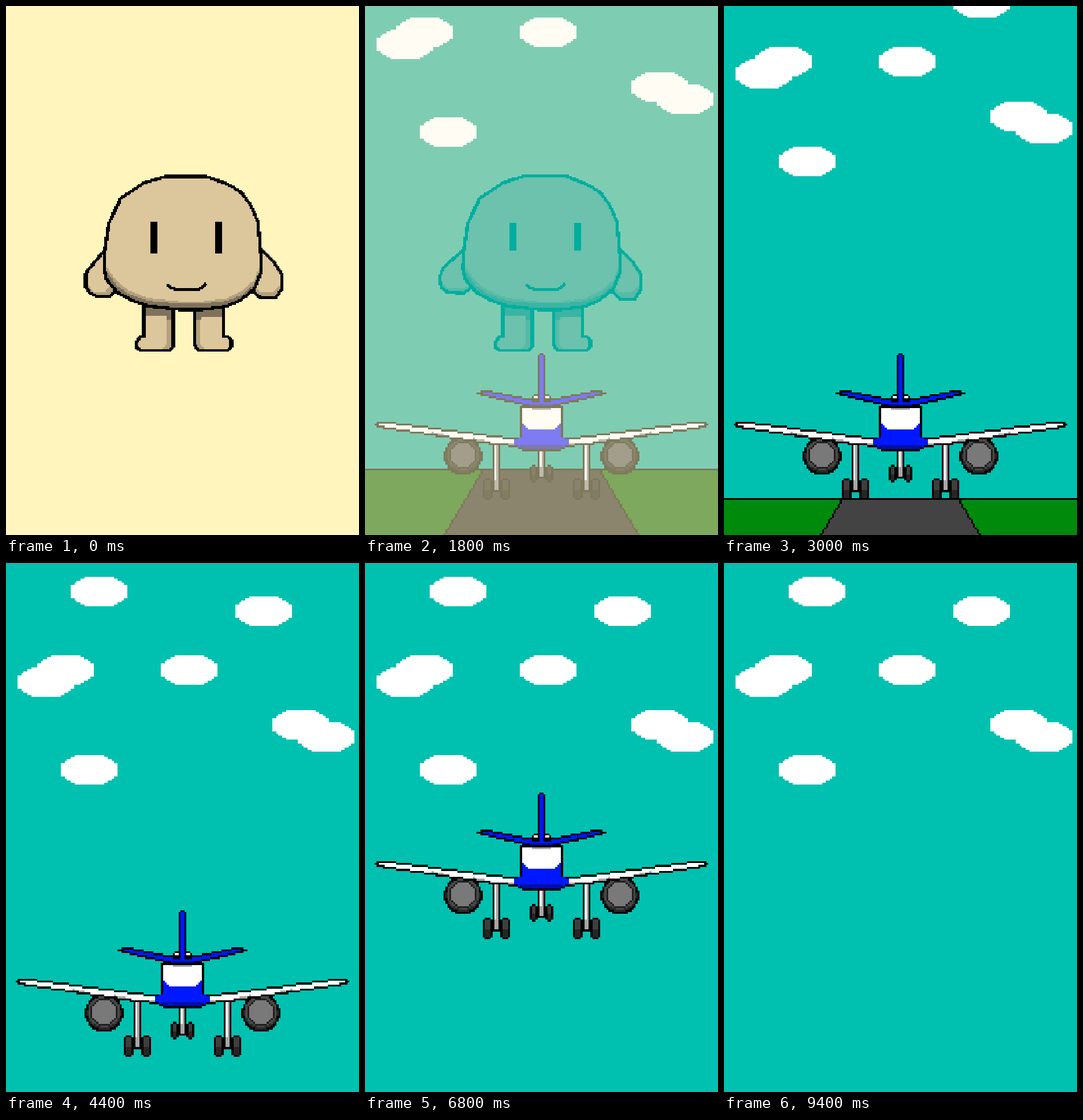
These frames come from a looping animation (611x917 px, 9600 ms). An HTML page with a canvas:

```html
<!DOCTYPE html>
<html>
<head>
<meta charset="utf-8">
<style>
html, body { margin: 0; width: 611px; height: 917px; overflow: hidden; background: #fff5bd; }
canvas { display: block; }
</style>
</head>
<body>
<script>
const W = 611, H = 917, UNIT = W / 180, STEP = 200, FRAMES = 48;

function makeCanvas(w, h) {
  const canvas = Object.assign(document.createElement('canvas'), { width: w, height: h });
  return canvas.getContext('2d', { willReadFrequently: true });
}

// Rasterises paths into hard-edged cells; paths are in cell units unless an origin and scale are given.
function sprite(x, y, cols, rows, unit, paint, ox = 0, oy = 0, scale = 1) {
  const edge = (start, i) => Math.round(start + i * unit) - Math.round(start);
  const ctx = makeCanvas(edge(x, cols), edge(y, rows));
  const shape = (d, fill, stroke, width = 1) => {
    const path = new Path2D(d);
    ctx.lineWidth = width;
    for (let j = 0; j < rows; j++) for (let i = 0; i < cols; i++) {
      const px = ox + i * scale, py = oy + j * scale;
      const color = stroke && ctx.isPointInStroke(path, px, py) ? stroke
        : fill && ctx.isPointInPath(path, px, py) ? fill : null;
      if (!color) continue;
      ctx.fillStyle = color;
      const left = edge(x, i), top = edge(y, j);
      ctx.fillRect(left, top, edge(x, i + 1) - left, edge(y, j + 1) - top);
    }
  };
  paint(shape);
  return { img: ctx.canvas, x: Math.round(x), y: Math.round(y) };
}

const circle = (x, y, r) => `M${x - r} ${y}a${r} ${r} 0 1 1 ${2 * r} 0a${r} ${r} 0 1 1 ${-2 * r} 0Z`;

function paintPlane(shape) {
  const BLUE = '#0018ff', NAVY = '#000fa8', GREY = '#a6a6a6';

  const wheel = (x, y, w, h) => {
    const d = `M${x} ${y + 1}L${x + 1} ${y}H${x + w - 1}L${x + w} ${y + 1}V${y + h - 1}L${x + w - 1} ${y + h}H${x + 1}L${x} ${y + h - 1}Z`;
    shape(d, '#3e3e3e');
    shape(`M${x} ${y + h * .6}H${x + w}V${y + h - 1}L${x + w - 1} ${y + h}H${x + 1}L${x} ${y + h - 1}Z`, '#262626');
    shape(d, null, '#000');
  };
  const gear = (x, top, bottom, size, tall) => {
    shape(`M${x} ${top}V${bottom}H${x + 3}V${top}Z`, '#fff', '#000');
    shape(`M${x + 1.5} ${bottom - 5.5}V${bottom - .5}`, null, GREY, 2);
    shape(`M${x + 2} ${top}V${bottom - .5}`, null, GREY);
    wheel(x - 1 - size, bottom - 6, size, tall);
    wheel(x + 4, bottom - 6, size, tall);
  };
  const engine = x => {
    shape(circle(x, 52, 9.2), '#282828');
    shape(circle(x, 51, 8.3), '#484848');
    shape(circle(x, 52, 9.2), null, '#000');
    shape(circle(x, 51.5, 6.6), '#797979', '#202020');
  };
  const wing = side => {
    const at = x => side < 0 ? x : 169 - x;
    const d = `M${at(0)} 36L${at(2)} 35H${at(7)}L${at(73)} 43.6V47L${at(60)} 45.8L${at(2)} 37.2Z`;
    shape(d, '#fff');
    for (const x of [28, 49, 65]) {
      const y = 36.2 + x * .146;
      shape(`M${at(x)} ${y}L${at(x + 6)} ${y + .9}`, null, GREY);
    }
    shape(d, null, '#000');
  };

  gear(60, 45, 70, 4, 10);
  gear(106, 45, 70, 4, 10);
  gear(83, 49, 63, 3, 8);
  engine(44.5);
  engine(124.5);
  wing(-1);
  wing(1);
  shape('M74 27H95V43H74Z', '#fff', '#000');
  shape('M80 28H89', null, GREY);
  shape('M75 36L79 39H90L94 36V44H75Z', BLUE, BLUE, .2);
  shape('M74.6 42L71 44V46L76 49H93L98 46V44L94.4 42Z', BLUE, BLUE, .2);
  shape('M74 47.5H95', null, NAVY, 1.2);
  shape('M70 46.5L76 49H93L99 46.5', null, '#000');
  shape('M79 25V23L81 21H88L90 23V25Z', '#fff', '#000');
  shape('M53 20L55 19H57L80 23.5H89L112 19H114L116 20L114 21L92 26L88 27H81L77 26L55 21Z', BLUE, '#000');
  shape('M79 25.6H90', null, NAVY);
  shape('M83 1L84 0H85L86 1V24H83Z', BLUE, '#000');
  shape('M84.5 20V24.6', null, BLUE, 2);
}

const toPath = points => 'M' + points.map(p => p.join(' ')).join('L');
const morph = (a, b, k) => toPath(a.map((p, i) => p.map((v, j) => v + (b[i][j] - v) * k)));

// Idle pose: 0 is rest, 1 has the left arm lifted and the eyes narrowed.
function paintBuddy(shape, k) {
  const TAN = '#dcc69c', MID = '#b3a07e', SHADE = '#7f725b', LINE = 5.6;
  const top = `M275 ${296 - k}H348L384 309L407 323L424 346L436 374L441 430`;
  const flank = 'L171 425L178 376L199 333L240 306Z';
  const body = top + `L442 460L429 492L404 511L380 521L340 526H300L245 520L215 509L192 496L174 474L${170 - k} 455` + flank;
  const limb = (d, light) => {
    shape(d, MID);
    shape(light, TAN);
    shape(d, null, '#000', LINE);
  };

  const left = morph(
    [[170, 424], [138, 463], [138, 487], [146, 498], [156, 503], [180, 503], [190, 493]],
    [[169, 424], [136, 453], [129, 470], [132, 488], [143, 496], [170, 498], [186, 487]], k);
  limb(left, `M168 428L${140 - 6 * k} ${463 - 7 * k}L${140 - 8 * k} ${482 - 4 * k}L${152 - 8 * k} ${495 - 6 * k}L172 ${495 - 6 * k}L180 484Z`);
  limb(`M441 422L463 443L478 466V490L467 ${506 + 2 * k}H441L429 496Z`, 'M441 426L461 445L474 466V484L464 495H440L432 488Z');

  limb('M239 522V573L232 574L226 582V592L233 597H284L289 590V522Z', 'M240 522V575L230 579V592L235 595H270L278 587V522Z');
  limb('M327 522V588L333 597H384L390 590V580L384 573H377V522Z', 'M336 522V585L345 595H384L388 588V580L382 576H375V522Z');
  shape('M242 522H286V543H279V537H242Z', SHADE);
  shape('M330 522H374V539H340L336 545H330Z', SHADE);

  shape(body, SHADE);
  shape(top + 'L441 456L430 482L408 501L382 511L342 516H300L246 511L212 499L192 485L174 460' + flank, MID);
  shape(top + 'L440 450L430 475L408 494L382 507L342 512H300L246 506L212 493L192 477L174 453' + flank, TAN);
  shape(body, null, '#000', LINE);

  for (const x of [249.5, 362]) {
    shape(`M${x} ${373 + 3 * k}h12V${430 - 6 * k}h-12Z`, '#000');
  }
  shape('M279 482L285 488L293 491H333L340 488L346 481', null, '#000', LINE);
}

const plane = sprite(5 * UNIT, 177 * UNIT, 170, 75, UNIT, paintPlane);
const cloud = sprite(0, 0, 29, 15, UNIT, shape =>
  shape('M-.4 4L7 -.4H21L28.4 4V10L21 14.4H7L-.4 10Z', '#fff'));
const ground = sprite(0, 802, 180, 35, UNIT, shape => {
  shape('M-1 -1H181V36H-1Z', '#008a0c');
  shape('M60 0H119L140 35H39Z', '#434343', '#000');
  shape('M-1 0H181', null, '#000');
});
const buddies = [0, .25, .75, 1].map(k =>
  sprite(120, 285, 154, 135, 2.4, shape => paintBuddy(shape, k), 121.2, 286.2, 2.4));
const clouds = [[112, 24], [397, 58], [54, 160], [20, 181], [268, 160], [461, 255], [505, 276], [95, 333]];

const clamp = (v, lo, hi) => Math.min(hi, Math.max(lo, v));

function drawMeadow(ctx, n) {
  ctx.fillStyle = '#fff5bd';
  ctx.fillRect(0, 0, W, H);
  const { img, x, y } = buddies[3 - Math.abs(3 - n % 6)];
  ctx.drawImage(img, x, y);
}

function drawSky(ctx, n) {
  ctx.fillStyle = '#00c1b0';
  ctx.fillRect(0, 0, W, H);
  const pan = clamp(n - 11, 0, 11) * 12.74;
  ctx.drawImage(ground.img, 0, Math.round(ground.y + pan));
  for (const [x, y] of clouds) ctx.drawImage(cloud.img, x, Math.round(y - 140 + pan));

  // The plane climbs in two speeds, then shrinks into the distance.
  const rise = clamp(n - 22, 0, 8) * 12.75 + clamp(n - 30, 0, 6) * 25.5;
  const away = (Math.max(0, n - 36) / 6) ** 1.55;
  const scale = 1 - .485 * away;
  if (scale <= 0) return;
  const w = plane.img.width * scale, h = plane.img.height * scale;
  let x = W / 2 - w / 2, y = 728.5 - rise - 354 * away - h / 2;
  if (scale === 1) [x, y] = [plane.x, Math.round(y)];
  ctx.drawImage(plane.img, x, y, w, h);
}

// The cross-fade mixes in linear light.
const linear = Float32Array.from({ length: 256 }, (_, i) =>
  i < 11 ? i / 3294.6 : ((i / 255 + .055) / 1.055) ** 2.4);
const encode = Uint8Array.from({ length: 4097 }, (_, i) => {
  const v = i / 4096;
  return Math.round(255 * (v < .0031308 ? 12.92 * v : 1.055 * v ** (1 / 2.4) - .055));
});

const stage = makeCanvas(W, H), layer = makeCanvas(W, H);
document.body.append(stage.canvas);

function drawFade(n, mix) {
  drawMeadow(layer, n);
  drawSky(stage, n);
  const from = layer.getImageData(0, 0, W, H).data;
  const result = stage.getImageData(0, 0, W, H), to = result.data;
  for (let i = 0; i < to.length; i++) {
    if (i % 4 < 3) to[i] = encode[Math.round(4096 * (linear[from[i]] * (1 - mix) + linear[to[i]] * mix))];
  }
  stage.putImageData(result, 0, 0);
}

function render(n) {
  const mix = clamp((n - 5.2) / 4.8, 0, 1);
  if (mix === 0) drawMeadow(stage, n);
  else if (mix === 1) drawSky(stage, n);
  else drawFade(n, mix);
}

const start = performance.now();
let shown = -1;
function tick() {
  const n = Math.floor((performance.now() - start) / STEP) % FRAMES;
  if (n !== shown) render(shown = n);
  requestAnimationFrame(tick);
}
tick();
</script>
</body>
</html>
```
